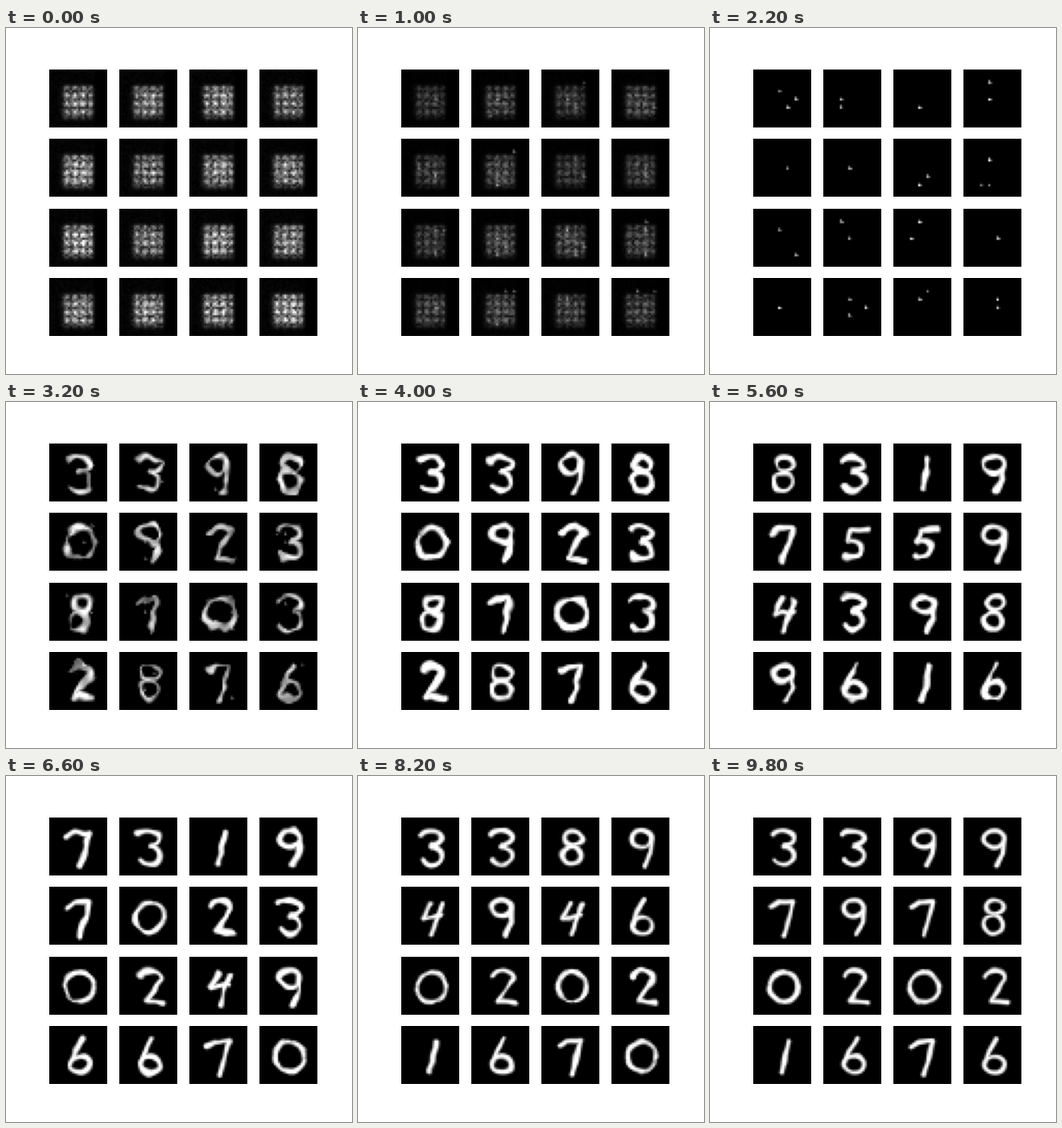
A matplotlib script that plays this animation: 400 px wide and 400 px high, repeating every 10 s.

```python
import numpy as np
import matplotlib.pyplot as plt
from matplotlib.animation import FuncAnimation

N = 28                    # pixels per tile side
FRAMES, STEP = 50, 200
DOTS_AT = 11              # frame at which only sparks are left

# What the sixteen tiles resemble at each stage of training.
STAGES = {
    20: "3398 0923 8703 2876",
    28: "8319 7559 4398 9616",
    33: "7319 7023 0249 6670",
    41: "3389 4946 0202 1670",
    49: "3399 7978 0202 1676",
}
KEYS = sorted(STAGES)

Y, X = np.mgrid[0:N, 0:N]
KNOTS = np.linspace(0, N - 1, 9)
SPREAD = np.exp(-((np.arange(N)[:, None] - KNOTS) / 2.6)**2)


def arc(cx, cy, rx, ry, start=0, end=360):
    t = np.radians(np.linspace(start, end, 36))
    return np.column_stack([cx + rx * np.cos(t), cy + ry * np.sin(t)])


def line(*xy):
    p = np.reshape(xy, (-1, 2))
    t = np.linspace(0, len(p) - 1, 12 * len(p))
    k = np.arange(len(p))
    return np.column_stack([np.interp(t, k, p[:, 0]), np.interp(t, k, p[:, 1])])


# Skeletons in a unit box, y pointing down.
DIGITS = {
    "0": [arc(.51, .5, .63, .42)],
    "1": [line(.72, .08, .42, .95)],
    "2": [arc(.55, .22, .45, .2, -170, 40), line(.9, .35, .35, .9, 1.1, .95)],
    "3": [arc(.45, .22, .5, .2, -150, 80), arc(.5, .72, .45, .26, -90, 150)],
    "4": [line(.45, .1, .1, .55, .9, .45), line(.95, .15, .5, 1)],
    "5": [line(1.1, .1, .35, .12, .25, .45), arc(.4, .67, .45, .25, -90, 130)],
    "6": [line(.62, 0, .3, .35, .1, .7), arc(.52, .73, .45, .23)],
    "7": [line(-.05, .22, .3, .08, .9, .06, .75, .45, .52, 1.02)],
    "8": [arc(.55, .22, .38, .2), arc(.48, .72, .42, .25)],
    "9": [arc(.5, .25, .45, .23), line(.95, .25, .9, .65, .62, 1)],
}


def smooth_noise(rng):
    return SPREAD @ rng.normal(size=(9, 9)) @ SPREAD.T / 1.8


def draw_digit(stage, cell, shake):
    """A stroke digit, bent and worn less and less as training goes on."""
    rng = np.random.default_rng(stage * 16 + cell)
    age = (stage - KEYS[0]) / (KEYS[-1] - KEYS[0])
    bend = 0.8 - 0.5 * age
    wx = X + bend * smooth_noise(rng) + shake[0]
    wy = Y + bend * smooth_noise(rng) + shake[1]
    char = STAGES[stage].replace(" ", "")[cell]
    pts = np.vstack(DIGITS[char]) * (11, 17) + (8.7, 5.6)
    d = np.hypot(wx[..., None] - pts[:, 0], wy[..., None] - pts[:, 1]).min(-1)
    wear = (0.35 - 0.2 * age) * smooth_noise(rng)
    return np.clip((1.35 - 0.25 * age - d) / 1.6 + 0.5 + wear * (d < 2.5), 0, 1)


def draw_blob(rng):
    """Soft square with the four-pixel weave of an untrained network."""
    edge = lambda v, a, b: 1 / (1 + np.exp(-2 * (v - a))) / (1 + np.exp(2 * (v - b)))
    env = edge(X, 6, 20.5) * edge(Y, 7.5, 23)
    cx, cy = np.cos(np.pi * X / 2), np.cos(np.pi * Y / 2)
    tex = 0.44 + 0.14 * (cx + cy + cx * cy) + 0.4 * (rng.random((N, N)) - 0.5)
    glow = np.exp(-((X - 14.5)**2 + (Y - 15)**2) / 130)
    img = env * tex * (0.4 + 0.75 * glow) * rng.uniform(0.8, 1.2)
    return np.clip(img + 0.03 * rng.random((N, N)) * (X < 22), 0, 1)


def draw_sparks(rng):
    """A few bright pixels on the same four-pixel lattice."""
    img = np.zeros((N, N))
    for _ in range(rng.integers(1, 4)):
        x, y = rng.choice([8, 12, 12, 16, 16, 20]), rng.choice([6, 10, 14, 18, 22])
        img[y, x] = rng.uniform(0.5, 1)
        img[y, x + 1] = rng.uniform(0, 0.6)
        img[y - 1, x] = rng.uniform(0, 0.6)
    return img


def tile(frame, cell):
    rng = np.random.default_rng(1000 + frame * 16 + cell)
    if frame <= DOTS_AT:
        p = frame / DOTS_AT
        return np.clip((1 - p)**1.3 * draw_blob(rng) + p * draw_sparks(rng), 0, 1)
    if frame < KEYS[0]:
        p = (frame - DOTS_AT) / (KEYS[0] - DOTS_AT)
        shake = [2 * (1 - p) * smooth_noise(rng) for _ in range(2)]
        worn = (1 - p) * (0.6 + 0.7 * smooth_noise(rng))
        shape = draw_digit(KEYS[0], cell, shake)
        return np.clip(shape - worn * (shape > 0) + (1 - p) * draw_sparks(rng), 0, 1)
    k = min(np.searchsorted(KEYS, frame, side="right"), len(KEYS) - 1)
    a, b = KEYS[k - 1], KEYS[k]
    p = (frame - a) / (b - a)
    shake = [0.4 * np.sin(np.pi * p) * smooth_noise(rng) for _ in range(2)]
    v = (1 - p) * draw_digit(a, cell, shake) + p * draw_digit(b, cell, shake)
    return v * v * (3 - 2 * v)


fig, axes = plt.subplots(4, 4, figsize=(4, 4), dpi=100)
fig.subplots_adjust(left=0.125, right=0.9, bottom=0.11, top=0.88, wspace=0.2, hspace=0.2)
images = []
for ax in axes.flat:
    ax.axis("off")
    images.append(ax.imshow(np.zeros((N, N)), cmap="gray", vmin=0, vmax=1))


def update(frame):
    for cell, im in enumerate(images):
        im.set_data(tile(frame, cell))
    return images


anim = FuncAnimation(fig, update, frames=FRAMES, interval=STEP, init_func=lambda: update(0),
                     repeat=True, repeat_delay=0, blit=False)
plt.show()
```
